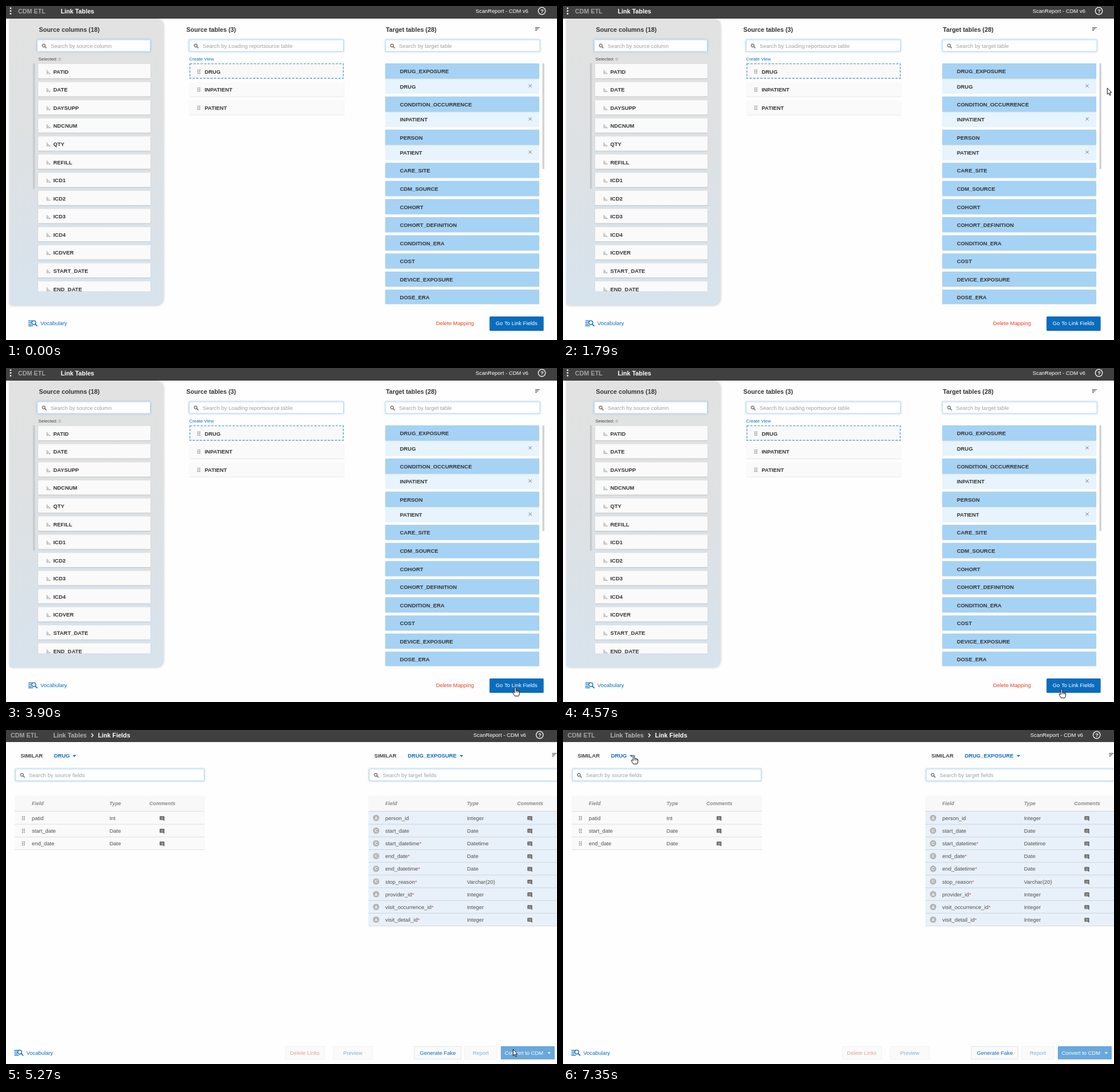
An HTML page with a canvas that plays this animation: 961 px wide and 582 px high, repeating every 8 s.

```html
<!DOCTYPE html>
<html lang="en">
<head>
<meta charset="utf-8">
<title>Link tables</title>
<style>
html, body { margin: 0; width: 100%; height: 100%; overflow: hidden; background: #fff; }
canvas { display: block; }
</style>
</head>
<body>
<canvas id="stage" width="961" height="582"></canvas>
<script>
const W = 961, H = 582, LOOP = 8000, PAGE_SWITCH = 5270;
const g = document.getElementById('stage').getContext('2d');
const BLUE = '#0a6cbc', INK = '#333', SMALL = 9.42, LARGE = 10.75;

// ---------- helpers ----------
function box(x, y, w, h, fill, radius = 0) {
  g.fillStyle = fill;
  g.beginPath();
  g.roundRect(x, y, w, h, radius);
  g.fill();
}

function shadowed(color, blur, dx, dy, draw) {
  g.save();
  g.shadowColor = color;
  g.shadowBlur = blur;
  g.shadowOffsetX = dx;
  g.shadowOffsetY = dy;
  draw();
  g.restore();
}

function clipped(x, y, w, h, draw) {
  g.save();
  g.beginPath();
  g.rect(x, y, w, h);
  g.clip();
  draw();
  g.restore();
}

// y is the middle of the capital letters
function text(str, x, y, color = INK, size = SMALL, style = '') {
  g.font = `${style} ${size}px "Liberation Sans", Arial, sans-serif`;
  g.fillStyle = color;
  g.fillText(str, x, y + size * 0.36);
  return x + g.measureText(str).width;
}
const bold = (str, x, y, color = INK, size = SMALL) => text(str, x, y, color, size, 'bold');

function line(points, color, width = 1) {
  g.strokeStyle = color;
  g.lineWidth = width;
  g.beginPath();
  points.forEach(([x, y]) => g.lineTo(x, y));
  g.stroke();
}

function polygon(points, fill, stroke) {
  g.beginPath();
  points.forEach(([x, y]) => g.lineTo(x, y));
  g.closePath();
  g.fillStyle = fill;
  g.fill();
  if (stroke) { g.strokeStyle = stroke; g.lineWidth = 1; g.stroke(); }
}

function circle(x, y, r, fill, stroke, width = 1) {
  g.beginPath();
  g.arc(x, y, r, 0, Math.PI * 2);
  if (fill) { g.fillStyle = fill; g.fill(); }
  if (stroke) { g.strokeStyle = stroke; g.lineWidth = width; g.stroke(); }
}

// ---------- icons ----------
function magnifier(x, y, color, r = 2.5, width = 1.2) {
  circle(x - 1, y - 1, r, null, color, width);
  line([[x - 1 + r * 0.7, y - 1 + r * 0.7], [x + r * 1.5, y + r * 1.5]], color, width + 0.2);
}

function dragDots(x, y) {
  for (const dx of [-2.3, 0.8])
    for (const dy of [-3.6, -0.8, 2]) box(x + dx, y + dy, 1.5, 1.5, '#666');
}

function barsIcon(x, y) {
  box(x, y - 3.5, 1, 7, '#999');
  box(x + 2, y - 1.2, 1, 4.7, '#999');
  box(x + 4, y + 1.5, 2.2, 2, '#aaa');
}

function sortIcon(x, y) {
  [8, 5.5, 3].forEach((w, i) => box(x, y + i * 2.4, w, 1.2, '#555'));
}

function commentIcon(x, y) {
  box(x - 4, y - 4, 8.2, 6.6, '#555', 0.8);
  polygon([[x + 1.5, y + 2], [x + 4.2, y + 2], [x + 4.2, y + 4.6]], '#555');
  for (const dy of [-2.4, -0.8, 0.8]) box(x - 2.6, y + dy, 5.4, 0.7, '#ddd');
}

function caret(x, y, color, s = 3.2) {
  polygon([[x - s, y - s / 2], [x + s, y - s / 2], [x, y + s / 2]], color);
}

function vocabulary(x, y) {
  [[-4.2, 8], [-1.2, 5.5], [1.8, 5.5], [4.4, 8]].forEach(([dy, w]) => box(x, y + dy - 0.5, w, 1.3, BLUE));
  magnifier(x + 10.5, y, BLUE, 3.4, 1.4);
  text('Vocabulary', x + 21, y + 0.2, BLUE);
}

function searchBox(x, y, w, h, hint) {
  shadowed('rgba(80,160,225,.6)', 3.5, 0, 0, () => box(x, y, w, h, '#fff', 1.5));
  g.strokeStyle = '#b9d8f0';
  g.lineWidth = 1;
  g.strokeRect(x + 0.5, y + 0.5, w - 1, h - 1);
  const mid = y + h / 2;
  magnifier(x + 12.8, mid + 0.8, '#666');
  text(hint, x + 24, mid + 0.2, '#9f9f9f');
}

function topBar(helpX, height) {
  box(0, 0, W, height, '#404040');
  text('ScanReport - CDM v6', helpX - 115.7, 8.3, '#fff');
  circle(helpX, 8.6, 6.2, null, '#fff', 1.3);
  text('?', helpX - 2.7, 8.9, '#fff', LARGE - 1, 'bold');
}

// ---------- first page ----------
const COLUMNS = ['PATID', 'DATE', 'DAYSUPP', 'NDCNUM', 'QTY', 'REFILL', 'ICD1', 'ICD2', 'ICD3',
  'ICD4', 'ICDVER', 'START_DATE', 'END_DATE'];
const TABLES = ['DRUG', 'INPATIENT', 'PATIENT'];
const LINKED = ['DRUG_EXPOSURE', 'CONDITION_OCCURRENCE', 'PERSON'];
const TARGETS = ['CARE_SITE', 'CDM_SOURCE', 'COHORT', 'COHORT_DEFINITION', 'CONDITION_ERA', 'COST',
  'DEVICE_EXPOSURE', 'DOSE_ERA'];
const PITCH = 31.57;

function card(x, y, w, shade) {
  shadowed(`rgba(0,0,0,${shade})`, 1.5, 0, 0.8, () => box(x, y, w, 25, '#fafafa', 1));
}

function sourcePanel() {
  const shade = g.createLinearGradient(0, 22, 0, 521);
  shade.addColorStop(0, '#e2e2e2');
  shade.addColorStop(0.35, '#dfe1e2');
  shade.addColorStop(1, '#d7e3ed');
  shadowed('rgba(0,0,0,.22)', 4, 0.7, 0.7, () => box(6, 22, 268, 499, shade, [0, 12, 12, 4]));
  bold('Source columns (18)', 57.5, 41.2, INK, LARGE);
  searchBox(54, 58.5, 198, 21, 'Search by source column');
  const end = text('Selected: ', 56.5, 91.8, '#444', 7.9);
  text('0', end, 91.8, '#888', 7.9);
  box(47, 100, 3.4, 218.5, '#c7cacc');
  clipped(50, 96, 210, 401.5, () => COLUMNS.forEach((name, i) => {
    const y = 114.3 + i * PITCH;
    card(56, y - 13.3, 196, 0.17);
    barsIcon(71, y + 0.6);
    bold(name, 82.5, y);
  }));
}

function sourceTables() {
  bold('Source tables (3)', 314.5, 41.2, INK, LARGE);
  searchBox(319, 58.5, 270, 21, 'Search by Loading reportsource table');
  text('Create View', 319.5, 91.8, BLUE, 7.9);
  TABLES.forEach((name, i) => {
    const y = 114.3 + i * PITCH;
    if (i) card(320, y - 13, 269.5, 0.1);
    else {
      box(320, 100, 269, 26.5, '#f9f9f9');
      g.setLineDash([4, 2.2]);
      g.strokeStyle = '#5f9fd6';
      g.lineWidth = 1.4;
      g.strokeRect(320.7, 100.6, 267.6, 25.4);
      g.setLineDash([]);
    }
    dragDots(336.3, y);
    bold(name, 346.5, y);
  });
}

function targetHead(name, y) {
  shadowed('rgba(0,0,0,.12)', 1.5, 0, 0.5, () => box(661.5, y - 13.8, 268.5, 26.3, '#a6d2f4', 1));
  bold(name, 687, y);
}

function targetTables() {
  bold('Target tables (28)', 662.5, 41.2, INK, LARGE);
  sortIcon(923, 37);
  searchBox(661.5, 58.5, 270, 21, 'Search by target table');
  box(935.5, 100, 3.4, 184, '#d2d2d2');
  clipped(655, 96, 280, 423.5, () => {
    LINKED.forEach((name, i) => {
      const y = 113.9 + i * 57.75;
      shadowed('rgba(0,0,0,.12)', 1.5, 0, 0.5, () => box(661.5, y + 12, 268.5, 27, '#e7f3fd'));
      targetHead(name, y);
      bold(TABLES[i], 687, y + 26.3);
      const cx = 914.2, cy = y + 25.2, s = 2.6;
      line([[cx - s, cy - s], [cx + s, cy + s]], '#777');
      line([[cx - s, cy + s], [cx + s, cy - s]], '#777');
    });
    TARGETS.forEach((name, i) => targetHead(name, 287.1 + i * PITCH));
  });
}

function tablesPage(t) {
  topBar(934.6, 22);
  for (const y of [3.8, 8.6, 13.4]) circle(8, y, 1.4, '#fff');
  bold('CDM ETL', 21, 9, '#a7a2a2', LARGE);
  bold('Link Tables', 95.5, 9, '#fff', LARGE);
  sourcePanel();
  sourceTables();
  targetTables();
  vocabulary(39, 552.8);
  text('Delete Mapping', 750, 553, '#e2421f');

  box(843.3, 541, 94.4, 25, BLUE, 1.5);
  const ripple = (t - 4890) / 300;
  if (ripple > 0) clipped(843.3, 541, 94.4, 25, () => circle(887, 556, 43 * ripple, 'rgba(255,255,255,.1)'));
  text('Go To Link Fields', 854, 553, '#fff');
}

// ---------- second page ----------
const SOURCE_FIELDS = [['patid', 'Int'], ['start_date', 'Date'], ['end_date', 'Date']];
const TARGET_FIELDS = [['person_id', 'Integer', 'A'], ['start_date', 'Date', 'C'],
  ['start_datetime*', 'Datetime', 'C'], ['end_date*', 'Date', 'C'], ['end_datetime*', 'Date', 'C'],
  ['stop_reason*', 'Varchar(20)', 'C'], ['provider_id*', 'Integer', 'A'],
  ['visit_occurrence_id*', 'Integer', 'A'], ['visit_detail_id*', 'Integer', 'A']];

function fieldTable(x, w, cols, fields, fill, rule) {
  box(x, 114.5, w, 27, '#f8f8f8');
  ['Field', 'Type', 'Comments'].forEach((name, i) => text(name, cols[i], 128, '#8a8a8a', 8.8, 'italic bold'));
  box(x, 141.5, w, fields.length * 22.15, fill);
  line([[x, 141.7], [x + w, 141.7]], rule, 0.9);
  fields.forEach(([name, type, badge], i) => {
    const y = 153.2 + i * 22.15;
    line([[x, y + 11], [x + w, y + 11]], rule, 0.9);
    if (badge) {
      circle(x + 13.5, y, 5.5, '#b3b3b3');
      g.textAlign = 'center';
      bold(badge, x + 13.5, y, '#fff', 7);
      g.textAlign = 'left';
    } else dragDots(x + 15.3, y + 0.3);
    const end = text(name.replace('*', ''), cols[0], y + 0.2, '#505050');
    if (name.endsWith('*')) text('*', end, y + 0.2, '#d9534a');
    text(type, cols[1], y + 0.2, '#505050');
    commentIcon(cols[2] + 22, y + 1);
  });
}

function similar(x, name, caretX) {
  bold('SIMILAR', x, 45, '#444');
  bold(name, x + 58.3, 45, BLUE);
  caret(caretX, 45.3, BLUE);
}

function button(label, x, w, textX, color, edge) {
  box(x, 551, w, 23, '#fafafa', 1.5);
  g.strokeStyle = edge;
  g.lineWidth = 1;
  g.strokeRect(x + 0.5, 551.5, w - 1, 22);
  text(label, textX, 562.6, color);
}

function fieldsPage() {
  topBar(930.8, 20.9);
  bold('CDM ETL', 8, 9, '#a7a2a2', LARGE);
  bold('Link Tables', 82.5, 9, '#b5b0b0', LARGE);
  line([[149, 6], [152, 9.2], [149, 12.4]], '#fff', 1.4);
  bold('Link Fields', 160.5, 9, '#fff', LARGE);

  similar(25.4, 'DRUG', 119.3);
  similar(642.4, 'DRUG_EXPOSURE', 794.3);
  sortIcon(952.5, 40.2);
  searchBox(16, 67.5, 330, 21.5, 'Search by source fields');
  searchBox(633, 67.5, 345, 21.5, 'Search by target fields');
  fieldTable(15, 332, [45, 180.5, 250], SOURCE_FIELDS, '#fafafa', '#dcdcdc');
  fieldTable(632, 340, [661.5, 804, 891.5], TARGET_FIELDS, '#e8f1f9', '#c9d2d9');

  vocabulary(14.5, 562.3);
  button('Delete Links', 487, 69, 495.3, '#e3a396', '#f1f1f1');
  button('Preview', 570.5, 69, 588, '#7fb1dc', '#f1f1f1');
  button('Generate Fake', 711.5, 82.5, 721.7, BLUE, '#e4e4e4');
  button('Report', 799.5, 57.5, 814, '#7fb1dc', '#f1f1f1');
  box(863, 551, 94, 23, '#69a8db', 1.5);
  text('Convert to CDM', 869.7, 562.6, '#fff');
  caret(947.3, 563, '#fff', 2.8);
}

// ---------- pointer ----------
// time, x, y of the hot spot
const PATH = [
  [0, 980, 600], [469, 980, 600], [470, 958, 576], [550, 970, 590],
  [1099, 970, 472], [1100, 953, 471], [1180, 938, 400], [1280, 940, 356],
  [1530, 940, 356], [1660, 946, 250], [1790, 949.5, 143.5], [1920, 920, 61], [2100, 760, 105], [2290, 626, 215],
  [2360, 630, 220], [2620, 790, 400], [2900, 964, 584],
  [3150, 868, 590], [3210, 868, 578], [3390, 881, 560],
  [3840, 881, 560], [3900, 888, 556.5], [4040, 925, 552], [4160, 932, 545], [4320, 890, 543],
  [4440, 856, 550], [4560, 868, 560], [4690, 886.5, 556],
  [5190, 886.5, 556], [5270, 884.5, 556.5], [5450, 884.5, 556.5], [5750, 862, 489],
  [6060, 862, 489], [6120, 858.5, 490], [6300, 640, 360], [6600, 350, 165], [6910, 236, 91],
  [6970, 220, 84], [7200, 138, 50], [7350, 123.5, 44]
];

function pointerAt(t) {
  const next = PATH.findIndex(p => p[0] > t);
  if (next < 0) return PATH[PATH.length - 1].slice(1);
  const [t0, x0, y0] = PATH[next - 1], [t1, x1, y1] = PATH[next];
  const k = (t - t0) / (t1 - t0);
  return [x0 + (x1 - x0) * k, y0 + (y1 - y0) * k];
}

const ARROW = [[0, 0], [0, 11], [2.5, 8.8], [4.3, 12.8], [6, 12], [4.3, 8.2], [7.6, 8]];
const HAND = new Path2D('M-1.3 9.5V1Q0-.8 1.3 1V6Q2.7 4.8 3.5 6.2Q4.8 5.4 5.6 6.8Q7.2 6.6 7.2 8.2V11' +
  'Q7 13 5.8 15.2H-.8Q-3 12-4.2 9.6Q-4.3 7.6-2.6 8.2Z');

function drawHand() {
  g.fillStyle = '#fff';
  g.fill(HAND);
  g.strokeStyle = '#111';
  g.lineWidth = 1;
  g.stroke(HAND);
  for (const x of [1.3, 3.5, 5.6]) line([[x, 6.5], [x, 9]], '#111', 0.8);
}

function pointer(t) {
  const overLink = (t > 3340 && t < 5130) || t > 7260;
  g.save();
  g.translate(...pointerAt(t));
  if (overLink) drawHand();
  else polygon(ARROW, '#fff', '#111');
  g.restore();
}

function frame(now) {
  const t = now % LOOP;
  box(0, 0, W, H, '#fefefe');
  if (t < PAGE_SWITCH) tablesPage(t);
  else fieldsPage();
  pointer(t);
  requestAnimationFrame(frame);
}
requestAnimationFrame(frame);
</script>
</body>
</html>
```
